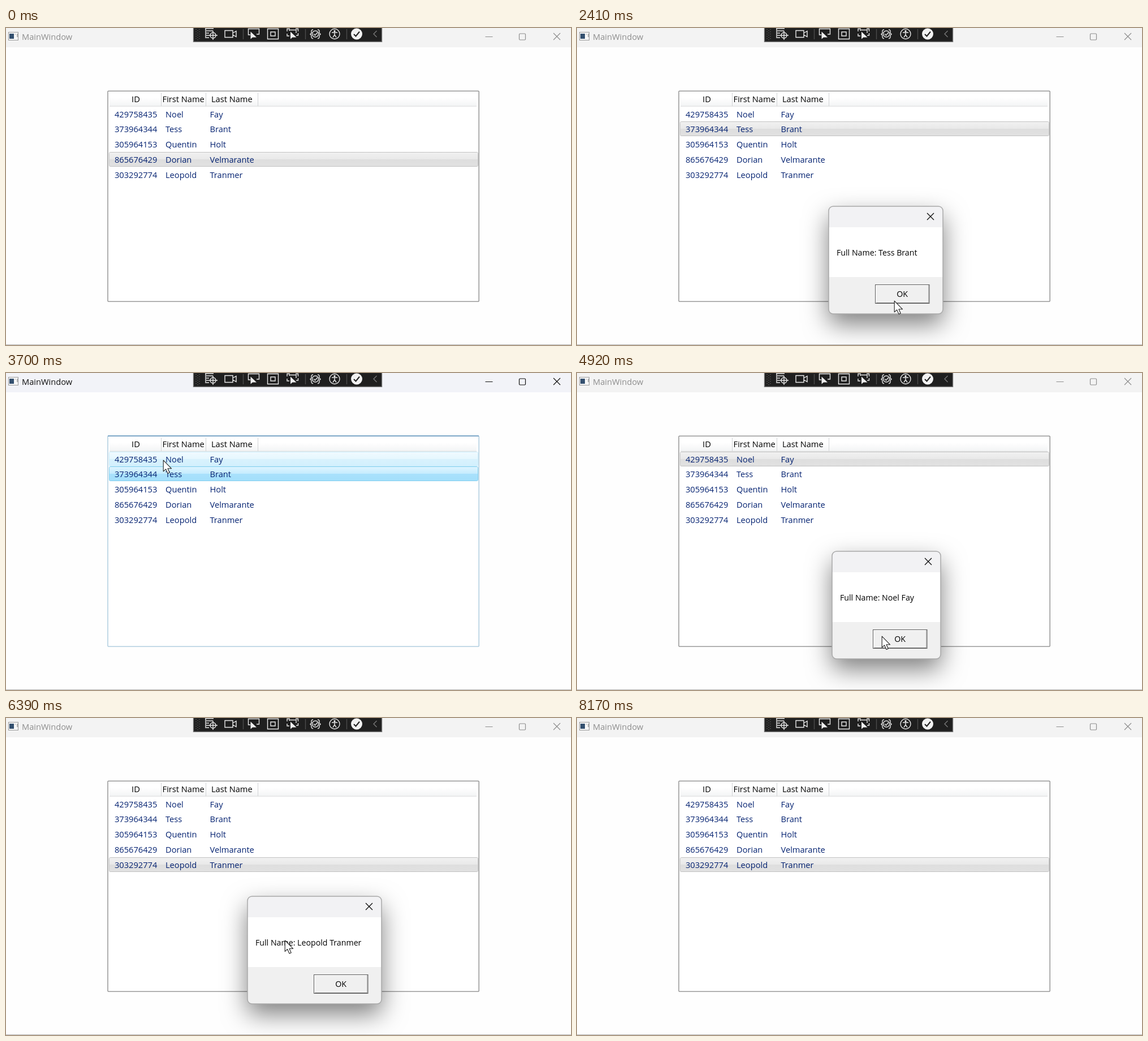
Recreate the animation shown at these times as an HTML page. Size 999 by 560 pixels, loop 8230 ms.

```html
<!DOCTYPE html>
<html lang="en">
<head>
<meta charset="utf-8">
<title>MainWindow</title>
<style>
html, body { margin: 0; width: 100%; height: 100%; overflow: hidden; background: #fefefe; }
svg { display: block; font: 14.65px "Open Sans", "Noto Sans", sans-serif; }
.mid { text-anchor: middle; }
.line { fill: none; stroke: currentColor; }
#rows { fill: #042271; }
#shade { filter: drop-shadow(0 18px 22px rgba(0,0,0,.5)); }
#dialog text { font-size: 14.2px; }
</style>
</head>
<body>
<svg width="999" height="560" viewBox="0 0 999 560">
  <defs>
    <linearGradient id="head" x2="0" y2="1"><stop offset=".4" stop-color="#fff"/><stop offset="1" stop-color="#f3f4f5"/></linearGradient>
    <linearGradient id="hover" x2="0" y2="1"><stop stop-color="#f0faff"/><stop offset=".48" stop-color="#e6f7fe"/><stop offset=".52" stop-color="#d8f2fd"/><stop offset="1" stop-color="#d3f0fd"/></linearGradient>
    <linearGradient id="blue" x2="0" y2="1"><stop stop-color="#def5ff"/><stop offset=".48" stop-color="#c6ecfe"/><stop offset=".52" stop-color="#a9e1fc"/><stop offset="1" stop-color="#a3dffb"/></linearGradient>
    <linearGradient id="gray" x2="0" y2="1"><stop stop-color="#f1f1f1"/><stop offset=".48" stop-color="#e9e9e9"/><stop offset=".52" stop-color="#dedede"/><stop offset="1" stop-color="#e1e1e1"/></linearGradient>
  </defs>

  <rect width="999" height="560" fill="#fefefe"/>
  <rect id="bar" width="999" height="34"/>
  <path d="M0 559.5H999" stroke="#b4b4b4"/>
  <g>
    <rect x="4.5" y="7.5" width="17" height="14" fill="#f7f7f7" stroke="#9a9a9a"/>
    <rect x="6" y="10" width="8" height="9" fill="#34506f"/>
    <path d="M16 11H17M20 10V16" stroke="#777"/>
  </g>
  <g id="caption">
    <text x="28" y="20.5" fill="currentColor">MainWindow</text>
    <path class="line" stroke-width="1.2" d="M847.5 15.5H860.5M968 9L980 21M980 9L968 21"/>
    <rect class="line" stroke-width="1.2" x="907.5" y="10" width="11" height="11" rx="1.5"/>
  </g>

  <g id="tools" fill="none" stroke="#e8e8e8" stroke-width="1.4">
    <rect x="331.5" y="-2" width="333" height="26.3" fill="#1f1f1f" stroke="#747474"/>
    <path d="M336 2V22M339 4V22M342 2V22" stroke="#6a6a6a" stroke-width="1.2" stroke-dasharray="1.2 2.8"/>
    <path d="M419.5 2V20M529.5 2V20M602.5 2V20" stroke="#4b4b4b"/>
    <path d="M352 1H367M354 5H366M354 9H359M354 13H358M354 17H359M353 1V18M366 5V21M358 13H374"/>
    <circle cx="366" cy="13" r="5"/>
    <path d="M387 4.5H401V16.5H387ZM401 9L407 5.5V15.5L401 12"/>
    <path d="M432 12H428.5V1.5H447.5V11H443"/>
    <path d="M462.5 1.5H481.5V19.5H462.5ZM468 7H476V14H468Z"/>
    <path d="M497 6V1.5H502M512 1.5H516.5V6M497 10V14H501M516.5 9V13H513M501 5V3.5H513V9"/>
    <path id="arrow" d="M432.5 6.5V19.5L436 16.5H443Z" fill="#f0f0f0" stroke="none"/>
    <use href="#arrow" x="70.5"/>
    <path d="M543 3Q539.5 3 540 6.5T537.5 11Q540 11 540 15T543 18.5M551 3Q554.5 3 554 6.5T556.5 11Q554 11 554 15T551 18.5M544 10.5L546.5 13L550.5 8"/>
    <circle cx="547" cy="10.5" r="5.5"/>
    <circle cx="581" cy="10.5" r="9"/>
    <path d="M576 8H586M581 8V12L578 16.5M581 12L584 16.5"/>
    <circle cx="581" cy="5.5" r="1" fill="#e8e8e8"/>
    <circle cx="620" cy="10.5" r="10" fill="#f2f2f2" stroke="none"/>
    <path d="M615 11L618.5 14.5L625 6.5" stroke="#1f1f1f" stroke-width="2"/>
    <path d="M655.5 5L650 10.5L655.5 16" stroke="#777"/>
  </g>

  <rect id="frame" x="180" y="111.3" width="656.2" height="371.8" rx="1" fill="#fff" stroke-width="1.3"/>
  <path id="top" d="M180 111.3H836" stroke="#5b8fb9" stroke-width="1.6"/>
  <rect x="183" y="113" width="649" height="25" fill="url(#head)"/>
  <path d="M183 138.2H832" stroke="#d9dadb"/>
  <path d="M274.5 114V138M353.5 114V138M445.5 114V138" stroke="#d2d4d6"/>
  <g class="mid">
    <text x="229.5" y="131">ID</text>
    <text x="313.7" y="131">First Name</text>
    <text x="399.3" y="131">Last Name</text>
  </g>
  <rect id="hot" x="182.5" width="652" height="25" rx="2" fill="url(#hover)" stroke="#c9ecfa"/>
  <rect id="pick" x="182.5" width="652" height="25" rx="2"/>
  <g id="rows"></g>

  <g id="dialog">
    <rect id="shade" y="315" height="190" rx="8" fill="#f0f0f0"/>
    <path id="cap" fill="#f2f2f4"/>
    <rect id="body" y="352" height="88" fill="#fff"/>
    <rect id="edge" y="315" height="190" rx="8" fill="none" stroke="#a9a9a9" stroke-width="1.5"/>
    <text id="message" y="401.5"></text>
    <g id="right">
      <path d="M-28 327L-16 339M-16 327L-28 339" stroke="#111" stroke-width="1.4"/>
      <rect x="-119.5" y="453.5" width="95.5" height="33" fill="#f0f0f0" stroke="#5c5c5c"/>
      <path id="light" d="M-118.5 485V454.5H-26" fill="none" stroke="#fff"/>
      <path id="dark" d="M-118 485.5H-25V454" fill="none" stroke="#7a7a7a"/>
      <text id="ok" class="mid" x="-72" y="475">OK</text>
    </g>
  </g>
  <circle id="ring" r="16" fill="#f8f400" fill-opacity=".58"/>
  <path id="pointer" d="M.2 .2V19.8L4.6 15.8L8 23.4L11.2 22L8 14.8H14.6Z" fill="#fff" stroke="#222" stroke-width="1.1" stroke-linejoin="round"/>
</svg>
<script>
const LOOP = 8230, ROW = 26.8, TOP = 139;
const people = [
  [429758435, "Noel", "Fay"],
  [373964344, "Tess", "Brant"],
  [305964153, "Quentin", "Holt"],
  [865676429, "Dorian", "Velmarante"],
  [303292774, "Leopold", "Tranmer"]
];
// time, x, y of the pointer tip
const path = [
  [440, 944, 484], [730, 896, 351], [970, 896, 351], [1570, 290, 176],
  [1950, 290, 176], [2410, 561, 482], [2790, 561, 482], [3470, 279, 167],
  [3550, 277, 158], [3700, 278, 154], [4080, 278, 154], [4600, 530, 462],
  [4680, 532, 463], [4840, 539, 465], [5020, 539, 465], [5220, 322, 283],
  [5310, 322, 283], [5540, 311, 266], [5690, 310, 265], [6080, 310, 265],
  [6610, 601, 468], [6840, 617, 470], [7150, 617, 470], [7400, 652, 478],
  [7660, 680, 562]
];
const dialogs = [
  { who: 1, left: 445, right: 647, open: 1950, close: 2790 },
  { who: 0, left: 451, right: 643, open: 4080, close: 5020 },
  { who: 4, left: 427, right: 664, open: 6080, close: 7150 }
];
const rowClicks = [[1720, 1870], [3850, 4000], [5840, 5990]];
const okClicks = [[2710, 2790], [4760, 4840], [7000, 7150]];
const activeTimes = [[2790, 3850], [5020, 5840], [7150, 8060]];
const focusTimes = [[1790, 1950], [2790, 4080], [5020, 6080], [7150, 8060]];

const $ = id => document.getElementById(id);
const within = (t, spans) => spans.some(([a, b]) => t >= a && t < b);
const clamp = v => Math.max(0, Math.min(1, v));
const set = (id, attrs) => { for (const k in attrs) $(id).setAttribute(k, attrs[k]); };
const show = (id, on) => $(id).style.display = on ? "" : "none";
const rowTop = i => Math.floor(TOP + i * ROW) + .5;

$("rows").innerHTML = people.map((cells, i) => cells.map((cell, c) =>
  `<text x="${[192, 282, 360.5][c]}" y="${157.5 + i * ROW}">${cell}</text>`).join("")).join("");

function tipAt(t) {
  const i = path.findIndex(p => p[0] > t);
  if (i < 1) return null;
  const [t0, x0, y0] = path[i - 1], [t1, x1, y1] = path[i];
  const u = (t - t0) / (t1 - t0), e = u * u * (3 - 2 * u);
  return [x0 + (x1 - x0) * e, y0 + (y1 - y0) * e];
}

function drawDialog(t) {
  const d = dialogs.find(d => t >= d.open && t < d.close + 150);
  show("dialog", d);
  if (!d) return;
  const { left, right } = d, width = right - left, pivot = left + .4 * width;
  let alpha = clamp((t - d.open) / 150), scale = .9 + .1 * alpha;
  if (t >= d.close) {
    const u = (t - d.close) / 150;
    alpha = .6 * (1 - u);
    scale = .98 - .04 * u;
  }
  set("dialog", { opacity: alpha, transform: `translate(${pivot} 360) scale(${scale}) translate(${-pivot} -360)` });
  for (const id of ["shade", "body", "edge"]) set(id, { x: left, width });
  set("cap", { d: `M${left} 352V323q0 -8 8 -8H${right - 8}q8 0 8 8V352Z` });
  set("message", { x: left + 14 });
  $("message").textContent = "Full Name: " + people[d.who].slice(1).join(" ");
  set("right", { transform: `translate(${right})` });
  const down = within(t, okClicks);
  set("light", { stroke: down ? "#7a7a7a" : "#fff" });
  set("dark", { stroke: down ? "#f0f0f0" : "#7a7a7a" });
  set("ok", { transform: down ? "translate(1 1)" : "" });
}

function draw(t) {
  const tip = tipAt(t), active = within(t, activeTimes), focus = within(t, focusTimes);
  const modal = dialogs.some(d => t >= d.open && t < d.close);
  const inside = tip && !modal && tip[0] > 180 && tip[0] < 836 && tip[1] > 111 && tip[1] < 483;

  set("bar", { fill: active ? "#f2f3f8" : "#f3f3f3" });
  $("caption").style.color = active ? "#111" : "#8e8e8e";
  set("frame", { stroke: focus || inside ? "#a3c5da" : "#858585" });
  show("top", focus || inside);

  const picked = t < 1790 ? 3 : t < 3920 ? 1 : t < 5910 ? 0 : 4;
  set("pick", { y: rowTop(picked), fill: focus ? "url(#blue)" : "url(#gray)", stroke: focus ? "#83cfee" : "#c2c2c2" });
  const over = inside ? Math.floor((tip[1] - TOP) / ROW) : -1;
  show("hot", over >= 0 && over < 5 && over !== picked);
  set("hot", { y: rowTop(over) });

  drawDialog(t);

  show("pointer", tip);
  show("ring", tip && within(t, rowClicks.concat(okClicks)));
  if (tip) for (const id of ["pointer", "ring"]) set(id, { transform: `translate(${tip})` });
}

const start = performance.now();
function tick() {
  draw((performance.now() - start) % LOOP);
  requestAnimationFrame(tick);
}
tick();
</script>
</body>
</html>
```
